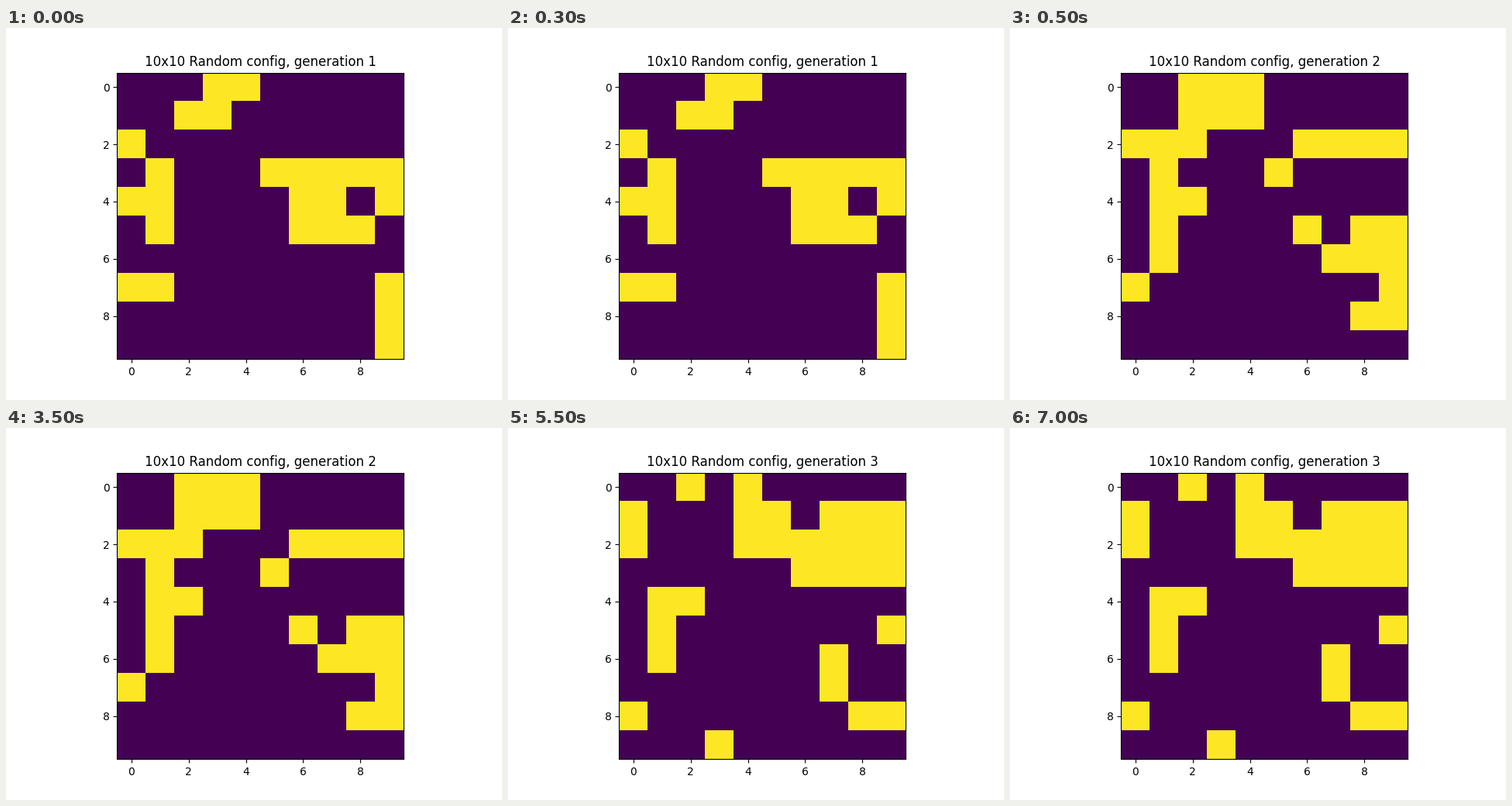
A matplotlib script that plays this animation: 640x480 px, repeating every 8000 ms.

```python
import numpy as np
import matplotlib.pyplot as plt
from matplotlib.animation import FuncAnimation

SIZE = 10
STEP = 500                      # ms per frame
FRAMES = 16
CHANGES = (1, 11)               # frames at which a new generation begins

SEED_ROWS = """
...##.....
..##......
#.........
.#...#####
##....##.#
.#....###.
..........
##.......#
.........#
.........#
""".split()


def evolve(grid):
    """One Game of Life step on a torus."""
    near = sum(np.roll(grid, (dy, dx), (0, 1))
               for dy in (-1, 0, 1) for dx in (-1, 0, 1) if dy or dx)
    return ((near == 3) | ((grid == 1) & (near == 2))).astype(int)


generations = [np.array([[int(c == "#") for c in row] for row in SEED_ROWS])]
for _ in CHANGES:
    generations.append(evolve(generations[-1]))

fig, ax = plt.subplots(figsize=(6.4, 4.8), dpi=100)
image = ax.imshow(generations[0], cmap="viridis", vmin=0, vmax=1)
title = ax.set_title("")


def draw(frame):
    gen = sum(frame >= start for start in CHANGES)
    image.set_data(generations[gen])
    title.set_text(f"{SIZE}x{SIZE} Random config, generation {gen + 1}")
    return image, title


anim = FuncAnimation(fig, draw, frames=FRAMES, interval=STEP,
                     init_func=lambda: draw(0), repeat=True, repeat_delay=0)
plt.show()
```
